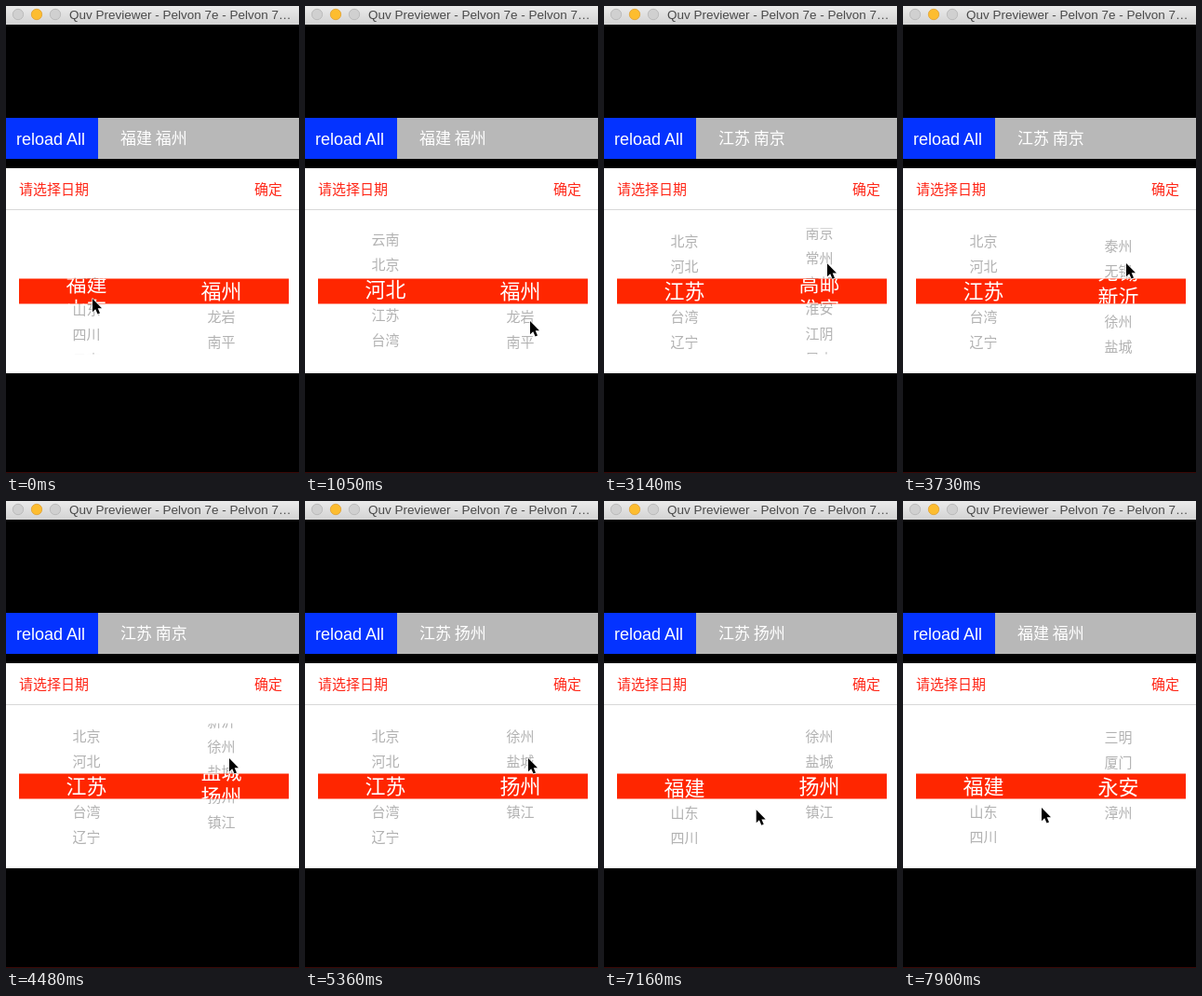
Write an HTML page that moves like this. It is 315 px wide and 501 px high and loops after 8000 ms.

```html
<!DOCTYPE html>
<html lang="zh">
<head>
<meta charset="utf-8">
<title>Picker</title>
<style>
  html, body { margin: 0; width: 100%; height: 100%; overflow: hidden; background: #000; }
  svg { display: block; width: 100vw; height: 100vh; }
  text { font-family: "Noto Sans CJK SC", "Noto Sans CJK", sans-serif; font-weight: 300; white-space: pre; }
  .latin { font-family: "Liberation Sans", Arial, sans-serif; font-weight: 400; }
  .row { text-anchor: middle; font-size: 15px; fill: #b2b2b2; }
  .big { text-anchor: middle; font-size: 22px; fill: #fff; }
  .tool { font-size: 15px; fill: #ff2617; }
</style>
</head>
<body>
<svg viewBox="0 0 315 501">
  <defs>
    <linearGradient id="bar" x2="0" y2="1">
      <stop stop-color="#ebebeb"/><stop offset="1" stop-color="#d3d3d3"/>
    </linearGradient>
    <clipPath id="wheel"><rect y="238.5" width="315" height="135"/></clipPath>
    <clipPath id="band"><rect x="14" y="292.5" width="290" height="27"/></clipPath>
  </defs>

  <rect width="315" height="501"/>
  <rect y="500" width="315" height="1" fill="#3a0806"/>
  <rect width="315" height="20" fill="url(#bar)"/>
  <g stroke-width=".8">
    <circle cx="13" cy="9" r="5.7" fill="#d0d0d0" stroke="#b4b4b4"/>
    <circle cx="33" cy="9" r="5.7" fill="#fdbd2f" stroke="#e0a030"/>
    <circle cx="53" cy="9" r="5.7" fill="#d0d0d0" stroke="#b4b4b4"/>
  </g>
  <text class="latin" x="68" y="14" font-size="13.5" fill="#4a4a4a">Quv Previewer - Pelvon 7e - Pelvon 7…</text>

  <rect y="120" width="315" height="44" fill="#b8b8b8"/>
  <rect y="120" width="99" height="44" fill="#0433ff"/>
  <text class="latin" x="11" y="148.5" font-size="18" fill="#fff">reload All</text>
  <text id="label" x="123" y="148" font-size="17" fill="#fff"></text>

  <rect y="174" width="315" height="220" fill="#fff"/>
  <rect y="218" width="315" height="1" fill="#d8d8d8"/>
  <text class="tool" x="14" y="202">请选择日期</text>
  <text class="tool" x="267" y="202">确定</text>

  <g id="rows" clip-path="url(#wheel)"></g>
  <rect x="14" y="292.5" width="290" height="27" fill="#ff2600"/>
  <g id="picked" clip-path="url(#band)"></g>

  <path id="cursor" d="M0 0V14.2L3.2 11.2L5.6 16.6L8 15.6L5.7 10.3H10Z" stroke="#fff" stroke-width="1.2" stroke-linejoin="round" paint-order="stroke"/>
</svg>
<script>
const LOOP = 8000, PITCH = 27, CENTER = 306, GLIDE = 430;
const $ = id => document.getElementById(id);

function addText(parent, cls, x, y, str) {
  const el = document.createElementNS('http://www.w3.org/2000/svg', 'text');
  el.setAttribute('class', cls);
  el.setAttribute('x', x);
  el.setAttribute('y', y);
  el.textContent = str;
  parent.appendChild(el);
}

// A column keeps a small grey copy and a large white copy that scroll together.
function makeColumn(x, names) {
  const layers = [['rows', 'row', 5.7], ['picked', 'big', 8.3]].map(([host, cls, drop]) => {
    const g = document.createElementNS('http://www.w3.org/2000/svg', 'g');
    names.split(' ').forEach((name, i) => addText(g, cls, x, CENTER + drop + i * PITCH, name));
    return $(host).appendChild(g);
  });
  return {
    scroll: pos => layers.forEach(g => g.setAttribute('transform', `translate(0 ${-pos * PITCH})`)),
    show: on => layers.forEach(g => g.setAttribute('display', on ? 'inline' : 'none'))
  };
}

const provinces = makeColumn(86.5, '福建 山东 四川 云南 北京 河北 江苏 台湾 辽宁');
const fujian = makeColumn(231.5, '福州 龙岩 南平 宁德 莆田 泉州 三明 厦门 永安 漳州');
const jiangsu = makeColumn(231.5, '南京 常州 高邮 淮安 江阴 昆山 连云港 南通 苏州 宿迁 泰州 无锡 新沂 徐州 盐城 扬州 镇江');

// The screen refreshes in three bursts of even steps, with pauses between.
const bursts = [[0, 2100, 14], [2700, 5360, 18], [5960, 7900, 13]];
function snap(t) {
  const [from, to, n] = bursts.filter(b => t >= b[0]).pop();
  const step = (to - from) / n;
  return from + Math.min(n, Math.floor((t - from) / step + 0.01)) * step;
}

function track(points, t) {
  const i = points.findIndex(p => p[0] > t);
  if (i === 0) return points[0].slice(1);
  if (i < 0) return points[points.length - 1].slice(1);
  const a = points[i - 1], b = points[i], k = (t - a[0]) / (b[0] - a[0]);
  return a.slice(1).map((v, j) => v + (b[j + 1] - v) * k);
}

const glide = (end, left, since) => end - left * Math.exp(-since / GLIDE);

const flickBack = [[6710, 6], [6860, 5.75], [7010, 2.6], [7160, -0.16], [7310, -0.75], [7460, -0.3], [7610, -0.05], [7750, 0]];
const cursorPath = [
  [0, 93, 314], [150, 93, 310], [300, 93, 302], [450, 94, 268], [600, 110, 275],
  [750, 170, 310], [900, 225, 332], [1050, 242, 338], [2600, 242, 338],
  [2848, 242, 322], [2996, 240, 276], [5900, 240, 276], [6110, 205, 272],
  [6410, 110, 268], [6710, 92, 272], [6860, 92, 279], [7010, 110, 335],
  [7160, 166, 331], [7900, 149, 329]
];

function provincePos(t) {
  if (t < 300) return 0.3 + t * 0.0013;
  if (t < 2090) return glide(6, 0.93, t - 1050);
  return track(flickBack, t)[0];
}

function cityPos(t) {
  if (t < 2690) return 0;
  if (t < 2990) return track([[2600, 0], [2848, 0.6], [2996, 2.3]], t)[0];
  if (t < 5200) return glide(15, 2.3, t - 3730);
  return t < 7740 ? 15 : track([[7750, 9], [7900, 7.96]], t)[0];
}

function draw(t) {
  const inJiangsu = t > 2090 && t < 7740;
  provinces.scroll(provincePos(t));
  fujian.show(!inJiangsu);
  jiangsu.show(inJiangsu);
  (inJiangsu ? jiangsu : fujian).scroll(cityPos(t));
  $('label').textContent = !inJiangsu ? '福建 福州' : t < 5350 ? '江苏 南京' : '江苏 扬州';
  $('cursor').setAttribute('transform', `translate(${track(cursorPath, t)})`);
}

const start = performance.now();
function tick() {
  draw(snap((performance.now() - start) % LOOP));
  requestAnimationFrame(tick);
}
tick();
</script>
</body>
</html>
```
